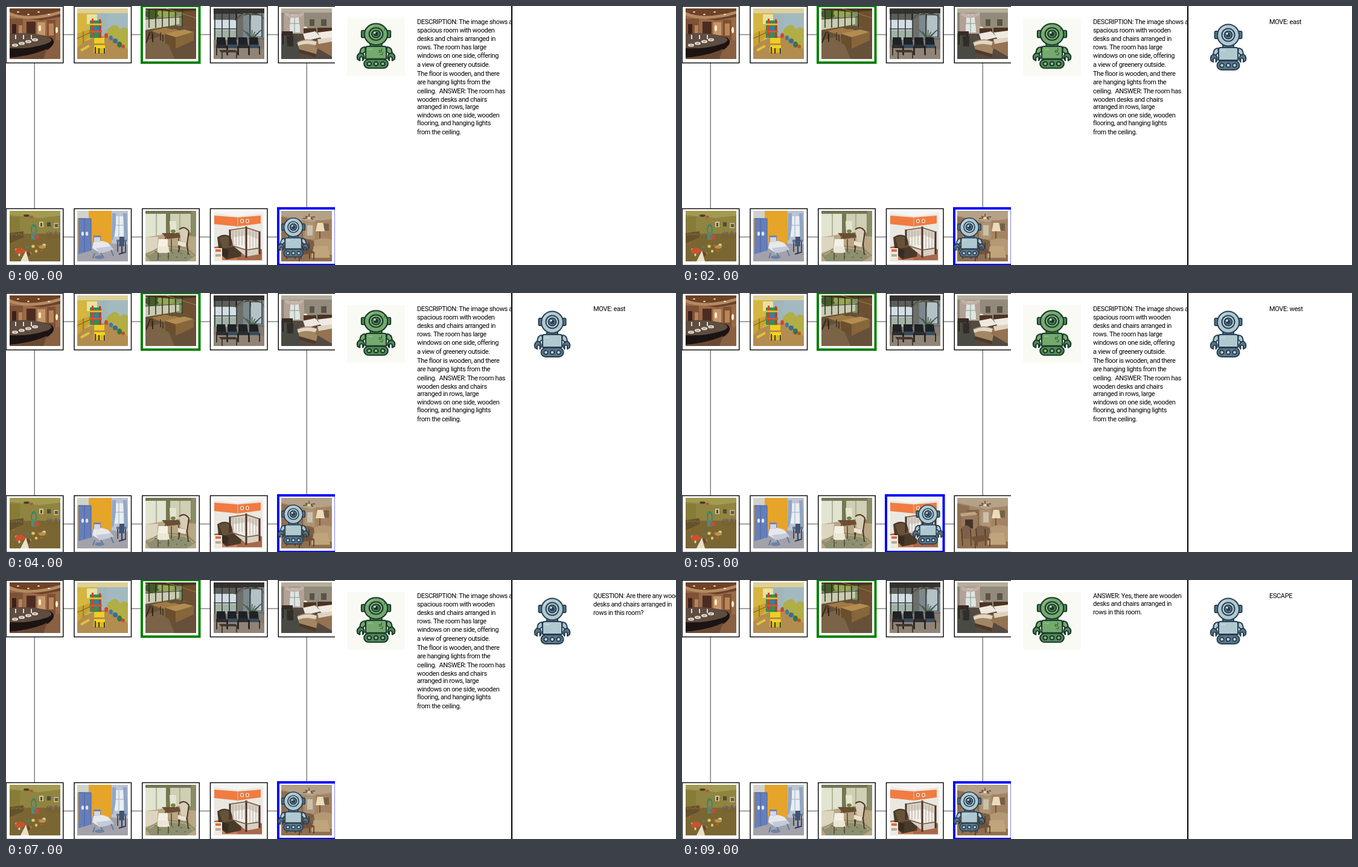
Recreate the animation shown at these times as an HTML page. Size 1110 by 430 pixels, loop 10 s.

```html
<!DOCTYPE html>
<html lang="en">
<head>
<meta charset="utf-8">
<title>Room walk</title>
<style>
html, body { margin: 0; width: 100%; height: 100%; overflow: hidden; background: #fff; }
svg { display: block; width: 1110px; height: 430px; }
text { font: 11px Roboto, Inter, sans-serif; letter-spacing: -0.37px; fill: #000; white-space: pre; }
</style>
</head>
<body>
<svg id="stage" viewBox="0 0 1110 430">
  <defs>
    <clipPath id="map"><rect width="545" height="430"/></clipPath>
    <clipPath id="photo"><rect width="84" height="84"/></clipPath>
    <clipPath id="left"><rect x="545" width="292" height="430"/></clipPath>
  </defs>
  <g clip-path="url(#map)">
    <g id="links" stroke="#808080" stroke-width="1.5"></g>
    <g id="rooms"></g>
    <rect x="225" y="0" width="95.5" height="94" fill="none" stroke="#008000" stroke-width="4"/>
    <rect id="here" y="336" width="95.5" height="94" fill="none" stroke="#0000ff" stroke-width="4"/>
    <g id="walker"></g>
  </g>
  <rect x="565" y="20" width="96" height="96" fill="#fafaf5"/>
  <g id="guide"></g>
  <g id="guideText" clip-path="url(#left)"></g>
  <path d="M838 0V430" stroke="#000" stroke-width="2"/>
  <g id="seeker"></g>
  <g id="seekerText"></g>
</svg>
<script>
const $ = id => document.getElementById(id);

// Shape helpers: rectangle, path, ellipse, stroke
const r = (x, y, w, h, c) => `<rect x="${x}" y="${y}" width="${w}" height="${h}" fill="${c}"/>`;
const p = (d, c) => `<path d="${d}" fill="${c}"/>`;
const e = (x, y, rx, ry, c) => `<ellipse cx="${x}" cy="${y}" rx="${rx}" ry="${ry}" fill="${c}"/>`;
const s = (d, c, w = 1) => `<path d="${d}" fill="none" stroke="${c}" stroke-width="${w}"/>`;
const many = (n, f) => Array.from({ length: n }, (_, i) => f(i)).join('');

const washroom = () =>
  r(0, 0, 84, 84, '#996a48') + p('M0 0H84V14L52 20L0 12Z', '#6d4228') +
  p('M0 6Q30 20 84 4V9Q36 24 0 12Z', '#b58a62') +
  many(4, i => e(14 + i * 17, 6 + i % 2 * 4, 2, 1, '#fff0cf')) +
  r(0, 17, 22, 28, '#7d5236') + r(4, 26, 7, 18, '#3a211b') + r(15, 28, 6, 16, '#b5855a') +
  r(28, 22, 15, 20, '#4b2c20') + r(46, 23, 13, 22, '#c59668') +
  e(50, 33, 2, 5, '#fff1d2') + e(78, 36, 2, 5, '#fff1d2') + r(62, 19, 14, 36, '#7d5034') +
  r(65, 25, 8, 20, '#b98656') + p('M56 56L84 52V84H40Z', '#8a6042') +
  p('M0 43Q34 38 68 48Q80 56 64 68Q42 79 0 82Z', '#1c1412') +
  p('M0 43Q34 37 66 48Q75 54 60 59Q32 68 0 66Z', '#5e4d40') +
  p('M0 82Q40 78 62 67L56 84H0Z', '#6b4a34') +
  many(4, i => e(9 + i * 11, 61 - i * 3, 5, 2.6, '#eee5dc')) +
  many(4, i => e(9 + i * 11, 61 - i * 3, 2.8, 1.2, '#b2a299')) +
  many(3, i => r(9 + i * 13, 44, 2, 7, '#ecdac5'));

const playroom = () =>
  r(0, 0, 84, 84, '#a0b6b8') + r(0, 0, 84, 8, '#ddd09a') + p('M0 8H32V46L0 62Z', '#d6b640') +
  r(16, 10, 17, 16, '#e9e1a4') + p('M50 8H84V34Q74 26 66 38L50 44Z', '#a3b9c0') +
  p('M84 34Q76 28 71 36Q66 22 55 31Q48 34 48 46L84 68Z', '#b0ae45') +
  p('M0 60L35 46H56L84 68V84H0Z', '#b38c50') + p('M0 42L22 34V46L0 66Z', '#c8a232') +
  s('M0 50L22 40M10 38V57', '#6b5920') +
  r(21, 20, 19, 29, '#3a8a58') + r(24, 17, 3, 29, '#d0422a') + r(36, 18, 3, 31, '#c93627') +
  r(21, 25, 20, 3, '#e2b824') + r(28, 30, 8, 8, '#3f78a8') + r(20, 37, 21, 3, '#dc542b') +
  e(48, 45, 3, 4, '#c84a35') + e(56, 49, 3, 4, '#4476a7') + e(63, 54, 4, 4, '#356d94') +
  e(70, 60, 4, 5, '#397348') + e(76, 63, 3, 3, '#c54b31') +
  r(28, 49, 17, 9, '#f0ce21') + r(28, 61, 18, 6, '#f4d322') + r(27, 66, 20, 8, '#dfb51f') +
  s('M30 64V75M36 66V75M45 66V75', '#314422', 2) + s('M6 70L20 62', '#dfc336', 4);

const classroom = () =>
  r(0, 0, 84, 84, '#6a5234') + r(0, 0, 84, 36, '#7a6040') +
  p('M0 0H64V28L0 34Z', '#7e9260') + p('M0 18L56 13V26L0 36Z', '#c9cbb0') +
  e(11, 9, 12, 8, '#465c2c') + e(34, 8, 14, 7, '#94a850') +
  p('M62 0H84V38L62 29Z', '#6d5030') + p('M0 0H84V4L50 6L0 2Z', '#4a3822') +
  many(6, i => s(`M${6 + i * 11} 2V32`, '#2b281e', 1.5)) + s('M0 18L62 14', '#363124') +
  s('M34 0L84 16', '#9b7b42') + p('M0 36L50 28L84 36V84H0Z', '#66503a') +
  p('M0 54L32 44L48 84H0Z', '#7b6348') +
  many(3, i => p(`M${9 + i * 14} ${37 + i * 2}l25-5l20 6l-24 7Z`, '#a07a44') +
    s(`M${11 + i * 14} ${38 + i * 2}v13m18-8v12m16-16v11`, '#3d2c18', 1.5)) +
  p('M32 42L64 35L80 39L50 48Z', '#b48c50') + p('M50 48L80 39V53L50 67Z', '#86663a') +
  p('M32 42L50 48V67L33 58Z', '#6b4e2c') + s('M8 39L1 57M12 42V56', '#352715', 2);

const sunroom = () =>
  r(0, 0, 84, 84, '#6c6e6a') + r(0, 5, 38, 49, '#d3dde4') + r(0, 36, 38, 16, '#a3b2a6') +
  p('M0 0H84V9H39V20L0 14Z', '#34322e') + r(0, 9, 36, 10, '#5d5e5a') +
  r(49, 8, 35, 41, '#7c888c') + r(62, 12, 18, 34, '#b4c2c8') +
  many(4, i => s(`M${2 + i * 12} 2V54`, '#2a2e2c', 1.5)) + s('M0 34H39M60 9V48M80 9V48', '#2f383a', 1.5) +
  many(7, i => p(`M60 10Q${40 + i * 7} ${5 + i % 2 * 5} ${37 + i * 8} ${22 - i % 3 * 5}Q${48 + i * 5} 5 60 10Z`, i % 2 ? '#37372a' : '#5c5140')) +
  many(7, i => s(`M64 54Q${54 + i * 3} 40 ${49 + i * 5} ${36 + i % 3 * 3}`, '#465947', 1.5)) +
  r(0, 52, 84, 32, '#857a6e') + p('M0 66L42 62L84 68V84H0Z', '#918477') +
  many(4, i => p(`M${5 + i * 18} 48h14l2 14h-16Z`, '#1d2226') +
    p(`M${4 + i * 18} 60h17l2 6h-17Z`, i % 2 ? '#3a4c5c' : '#2c2d30') +
    s(`M${5 + i * 18} 62v16m17-15v14`, '#161919', 1.5)) +
  p('M9 69H36L42 73H12Z', '#42382f') + s('M14 73V84M38 73V83', '#292420', 1.5);

const bedroom = () =>
  r(0, 0, 84, 84, '#8c8576') + r(0, 0, 84, 7, '#b5ae9c') + r(39, 7, 45, 34, '#928b7c') +
  r(4, 6, 34, 37, '#a8a295') + r(14, 10, 17, 30, '#dfe5e2') + s('M22 10V40M14 25H31', '#85948b') +
  p('M5 6H15Q16 27 11 41H5ZM29 6H37L39 41H33Q28 21 29 6Z', '#b3a196') +
  p('M7 6Q21 16 37 6V11Q22 20 7 12Z', '#c4b2a6') +
  r(47, 18, 8, 11, '#5c5347') + r(66, 18, 9, 11, '#5c5347') + e(40, 34, 3, 4, '#f6e6bd') +
  p('M0 42H84V84H0Z', '#544a40') + p('M0 46L18 42L30 58V84H0Z', '#4a4a44') +
  r(1, 38, 18, 7, '#382b26') + s('M3 44V60M17 44V58', '#2a2421', 2) + p('M9 46H20V63H10Z', '#302d2a') +
  p('M37 33H58V48H37Z', '#4c3424') + p('M60 32H84V50H60Z', '#4b3222') +
  p('M36 42L56 38L66 48L40 54Z', '#eee8e0') + p('M60 40L84 37V54L66 50Z', '#f0eae2') +
  p('M26 56Q43 47 62 56L58 76L30 68Z', '#a38664') + p('M27 57Q44 49 62 57L59 62Q41 56 28 62Z', '#e1d6c4') +
  p('M60 52L84 50V80L56 64Z', '#947252') + p('M60 51L84 48V55L62 59Z', '#ded3c0') +
  p('M30 68L58 76L57 81L29 73Z', '#513828');

const toyroom = () =>
  r(0, 0, 84, 84, '#8f8440') + p('M0 0H84V8L50 12L0 7Z', '#a39a52') + r(0, 10, 17, 27, '#867c38') +
  e(28, 8, 5, 2, '#4a4122') + e(36, 10, 3, 2, '#ad5934') + r(49, 18, 7, 9, '#d0c8a0') +
  r(51, 20, 3, 6, '#59451f') + r(62, 19, 6, 7, '#524c38') + r(73, 20, 8, 9, '#bfae88') +
  r(75, 22, 5, 5, '#5b5b46') + p('M0 46L29 38H63L84 45V84H0Z', '#7a6632') +
  p('M0 37L23 34V44L0 54Z', '#64522a') + many(6, i => r(2 + i * 4, 38 - i % 2, 3, 3, i % 2 ? '#a84d31' : '#4f744a')) +
  r(61, 36, 23, 10, '#786230') + many(5, i => r(63 + i * 4, 34 + i % 3, 3, 4, i % 2 ? '#a3523c' : '#5c7c80')) +
  e(40, 32, 5, 10, '#3a856c') + e(40, 32, 3, 6, '#918542') + r(36, 36, 8, 12, '#468e7a') + r(41, 40, 8, 7, '#b9513a') +
  many(12, i => e(7 + i * 37 % 51, 54 + i * 13 % 20, 1.6 + i % 3 * .6, 1.5 + i % 2, ['#d0502f', '#e0c45d', '#4a7d78', '#d8d0b4'][i % 4])) +
  p('M9 65Q20 57 26 66L23 71H10Z', '#c9522e') + e(29, 72, 6, 4, '#6a482f') +
  p('M18 84L27 66L32 84Z', '#e8e1c6') + e(54, 60, 6, 3, '#b3964c');

const blueRoom = () =>
  r(0, 0, 84, 84, '#e6a428') + p('M0 0H19V13H0Z', '#d2d2cc') + p('M57 0H84V60H57Z', '#bcc4d2') +
  r(62, 9, 15, 34, '#e8eef2') + s('M69 9V43M62 24H77', '#9cacbf') +
  p('M58 4H64Q65 34 59 49H57ZM76 4H82L84 50H78Z', '#93a6c2') +
  p('M0 64L23 52L84 56V84H0Z', '#a3a2aa') + p('M2 12L23 13V66L2 72Z', '#667fbb') +
  s('M12 13V69M2 13L23 13V66', '#4a649f') + e(9, 38, 2.2, 3.6, '#e2e4f0') + e(16, 38, 2.2, 3.6, '#e2e4f0') +
  r(27, 41, 12, 15, '#7184b0') + p('M27 52Q39 47 52 54L60 64L36 69L25 62Z', '#e6e8eb') +
  p('M31 62L56 59L60 65L37 71Z', '#c3cad9') + p('M28 44H38V52H28Z', '#d4d6e1') +
  s('M29 70L26 79M39 70L44 78M56 65L60 75', '#5f78a2', 2) + e(37, 77, 8, 3, '#6c82a5') +
  r(65, 48, 17, 4, '#62748f') + s('M67 52V68M80 52V70', '#3c4f6c', 2) + p('M70 43H78V59H69Z', '#435572') +
  s('M74 59V70M69 72L79 69', '#2d3b52', 2);

const dining = () =>
  r(0, 0, 84, 84, '#83855f') + r(0, 4, 36, 40, '#e2e4d2') + r(41, 4, 34, 32, '#cfcfb4') +
  s('M18 4V44M57 4V36', '#a0a486', 1.5) +
  p('M0 0H84V5H0Z', '#747654') + r(34, 3, 7, 41, '#75784f') + r(76, 0, 8, 46, '#8a8b67') +
  p('M0 44L38 38L84 43V84H0Z', '#b8a684') + p('M0 44L21 43L19 64L0 70Z', '#dcd6c0') +
  p('M0 73L28 57L69 61L84 74L68 84H8Z', '#8c9070') + s('M5 73L29 60L66 64L79 75', '#bda47e', 2) +
  many(9, i => e(17 + i * 7, 68 + i * 7 % 13, 2, 1, '#6d7150')) +
  p('M27 37H54L61 44L36 47Z', '#6b4e34') + s('M33 44V64M55 45V62M43 47V68', '#56402a', 1.5) +
  p('M40 17H51V37H41Z', '#e6e3d2') + p('M22 47H37V61H20Z', '#f4f0e4') +
  p('M20 59H38L40 70H20Z', '#ebe6d6') + s('M21 69V82M38 69V81', '#5b4630', 1.5) +
  p('M56 31Q65 25 71 34L69 53L59 50Z', '#d8cdb6') + s('M56 31Q65 24 72 34L69 55H57L55 69M69 55L71 73', '#4c3422', 2) +
  p('M54 50L68 53L66 60L54 57Z', '#eae3d2') + e(46, 34, 4, 3, '#74824a');

const nursery = () =>
  r(0, 0, 84, 84, '#f6f5f2') + p('M1 4L40 9L81 4V84H1Z', '#eae8e2') +
  p('M1 8L40 11L78 8V21L40 26L1 22Z', '#f07c42') + s('M40 11V52', '#c8c5bd') +
  many(2, i => e(47 + i * 9, 17, 3, 3.5, '#f6dfc4') + e(47 + i * 9, 17, 1.5, 2, '#ac6a3f')) +
  p('M1 60L36 54L80 64V82H1Z', '#a8684a') + p('M1 64L31 58L40 82H1Z', '#c97b55') +
  p('M6 44Q18 36 28 43L33 56L47 62L45 76L21 81L9 70Z', '#4a3a2a') +
  p('M9 45Q19 39 27 45L31 60L15 63Z', '#655238') + p('M9 60L25 65L23 79L10 72Z', '#372c22') +
  p('M27 33L55 27L76 34V72L54 76L32 58Z', '#d6d0c5') + p('M33 44L57 40L73 47V60L55 65L34 56Z', '#f2efe8') +
  s('M27 31V58M54 26V78M76 34V72', '#4b2f24', 3) + s('M27 32L54 28L76 35M30 58L54 65L76 62', '#75543a', 1.5) +
  many(5, i => s(`M${32 + i * 5} 33V57`, '#b0a294')) + many(3, i => s(`M${60 + i * 5} 34V62`, '#b0a294')) +
  r(1, 62, 13, 20, '#eee9df') + r(3, 64, 9, 4, '#e0683f') + r(3, 72, 9, 4, '#b0aaa2');

const lounge = () =>
  r(0, 0, 84, 84, '#a68a68') + p('M0 0H84V13L49 19L0 8Z', '#b4a188') + p('M0 10L20 14V60L0 65Z', '#8f6f52') +
  r(16, 20, 20, 29, '#80654c') + r(19, 25, 12, 20, '#5a4a3a') + r(39, 20, 16, 27, '#ae9474') +
  r(43, 24, 9, 17, '#c9c0ac') + r(57, 16, 26, 34, '#a48262') + r(71, 21, 8, 12, '#76604a') +
  s('M46 5V12M36 13L56 10M40 9L53 14', '#5a4838', 1.5) + e(46, 12, 3, 2, '#ead5a8') +
  p('M0 56L34 47L84 53V84H0Z', '#8f6f50') +
  p('M7 28L27 24L34 31V50L8 57Z', '#987a5c') + p('M13 36H26V51H13Z', '#43352b') +
  p('M5 26L29 23L34 28L6 31Z', '#bfa483') +
  p('M60 20H69L72 34H57Z', '#eadcba') + s('M64 34V51', '#6d5840', 2) +
  p('M54 50Q68 42 84 48V73L58 72Z', '#b39a74') + p('M51 59L77 58L81 78H50Z', '#bfa47c') +
  p('M36 50Q46 44 54 51L53 65H38Z', '#7d5f44') +
  many(2, i => p(`M${7 + i * 24} 50q8-8 15 0l-2 18h-13Z`, '#7c6048') +
    s(`M${7 + i * 24} 51l2 29m13-28l1 28`, '#4d3828', 1.5)) +
  p('M22 65L48 62L56 70L29 74Z', '#725238') + s('M30 74V84M54 70V81', '#4a3426', 1.5);

function robot(fill, light, dark, line) {
  const o = `stroke="${line}" stroke-width="2" stroke-linejoin="round"`;
  const side = `<path d="M-17 22Q-24 22-25 32L-20 34Q-19 30-16 30Z" fill="${fill}" ${o}/>
    <path d="M-25 32Q-31 36-28.500 43L-25 45V40Q-22 37-20.500 40V45Q-16 40-20 34Z" fill="${dark}" ${o}/>
    <rect x="-22.500" y="-6" width="6" height="12" rx="2" fill="${dark}" ${o}/>`;
  return `${side}<g transform="scale(-1 1)">${side}</g>
    <rect x="-9" y="15" width="18" height="7" fill="${dark}" ${o}/>
    <path d="M-13 21H13Q16 21 16 25V42H-16V25Q-16 21-13 21Z" fill="${fill}" ${o}/>
    <circle r="18" cy=".5" fill="${fill}" ${o}/>
    ${s('M-14-5Q-11-12-4-14', light, 2)}${s('M-12 26H-5', light, 2)}
    <circle r="10.500" fill="${light}" ${o}/><circle r="6.500" fill="${dark}" ${o}/>
    <circle r="3.500" fill="${line}"/><circle cx="-2" cy="-2" r="1.500" fill="#fff"/>
    <rect x="-18.500" y="43" width="37" height="15" rx="7.500" fill="${dark}" ${o}/>
    ${many(3, i => `<circle cx="${-10.5 + i * 10.5}" cy="50.500" r="3.200" fill="${light}" ${o}/>`)}`;
}

const blue = robot('#b0c9d1', '#c2d8de', '#5d7688', '#263f53');
const scratches = s('M5 28h3v3h-3zM9 24v4M11 31l-2 5M12-13l2 5l-2 3M6 35h3', '#2f5d38');
$('seeker').innerHTML = `<g transform="translate(905 48)">${blue}</g>`;
$('walker').innerHTML = `<g transform="scale(.857)">${blue}</g>`;
$('guide').innerHTML = `<g transform="translate(613 46.5) scale(1.07 .98)">${robot('#76a96e', '#8fbd84', '#558a56', '#17392a')}${scratches}</g>`;

const cols = [6, 118, 231, 344, 456];
const grid = [[washroom, playroom, classroom, sunroom, bedroom], [toyroom, blueRoom, dining, nursery, lounge]];
$('links').innerHTML = '<path d="M0 47.5H545M0 383.5H545M47.25 47V383M498.25 47V383"/>';
$('rooms').innerHTML = grid.map((row, j) => row.map((draw, i) => {
  const y = 4 + j * 336;
  return `<rect x="${0.25 + i * 112.75}" y="${y - 3.5}" width="94.5" height="94" fill="#fff" stroke="#000" stroke-width="1.4"/>
    <g transform="translate(${cols[i]} ${y})" clip-path="url(#photo)">${draw()}</g>`;
}).join('')).join('');

const describe = `DESCRIPTION: The image shows a
spacious room with wooden
desks and chairs arranged in
rows. The room has large
windows on one side, offering
a view of greenery outside.
The floor is wooden, and there
are hanging lights from the
ceiling.  ANSWER: The room has
wooden desks and chairs
arranged in rows, large
windows on one side, wooden
flooring, and hanging lights
from the ceiling.`;
const answer = 'ANSWER: Yes, there are wooden\ndesks and chairs arranged in\nrows in this room.';
const ask = 'QUESTION: Are there any wooden\ndesks and chairs arranged in\nrows in this room?';

const longLines = [30, 44, 58, 72, 86, 101, 116, 130, 145, 159, 171, 185, 198, 213];
const answerLines = [30, 43, 57];
function write(id, x, words, ys = longLines) {
  $(id).innerHTML = words.split('\n').map((t, i) => `<text xml:space="preserve" x="${x}" y="${ys[i]}">${t}</text>`).join('');
}

// One step per second: [at the east room, guide's words, seeker's words]
const west = [false, describe, 'MOVE: west'];
const east = [true, describe, 'MOVE: east'];
const steps = [
  [true, describe, ''], west, east, west, east, west, east,
  [true, describe, ask], [true, answer, ask], [true, answer, 'ESCAPE']
];

let shown = -1;
function show(n) {
  if (n === shown) return;
  shown = n;
  const [atEast, guide, seeker] = steps[n];
  $('here').setAttribute('x', atEast ? 451 : 338);
  $('walker').setAttribute('transform', `translate(${atEast ? 476 : 407.5} 367)`);
  $('seeker').style.display = seeker ? '' : 'none';
  write('guideText', 681, guide, guide === answer ? answerLines : longLines);
  write('seekerText', 973, seeker);
}

const start = performance.now();
function tick() {
  show(Math.floor((performance.now() - start) / 1000) % steps.length);
  requestAnimationFrame(tick);
}
tick();
</script>
</body>
</html>
```
